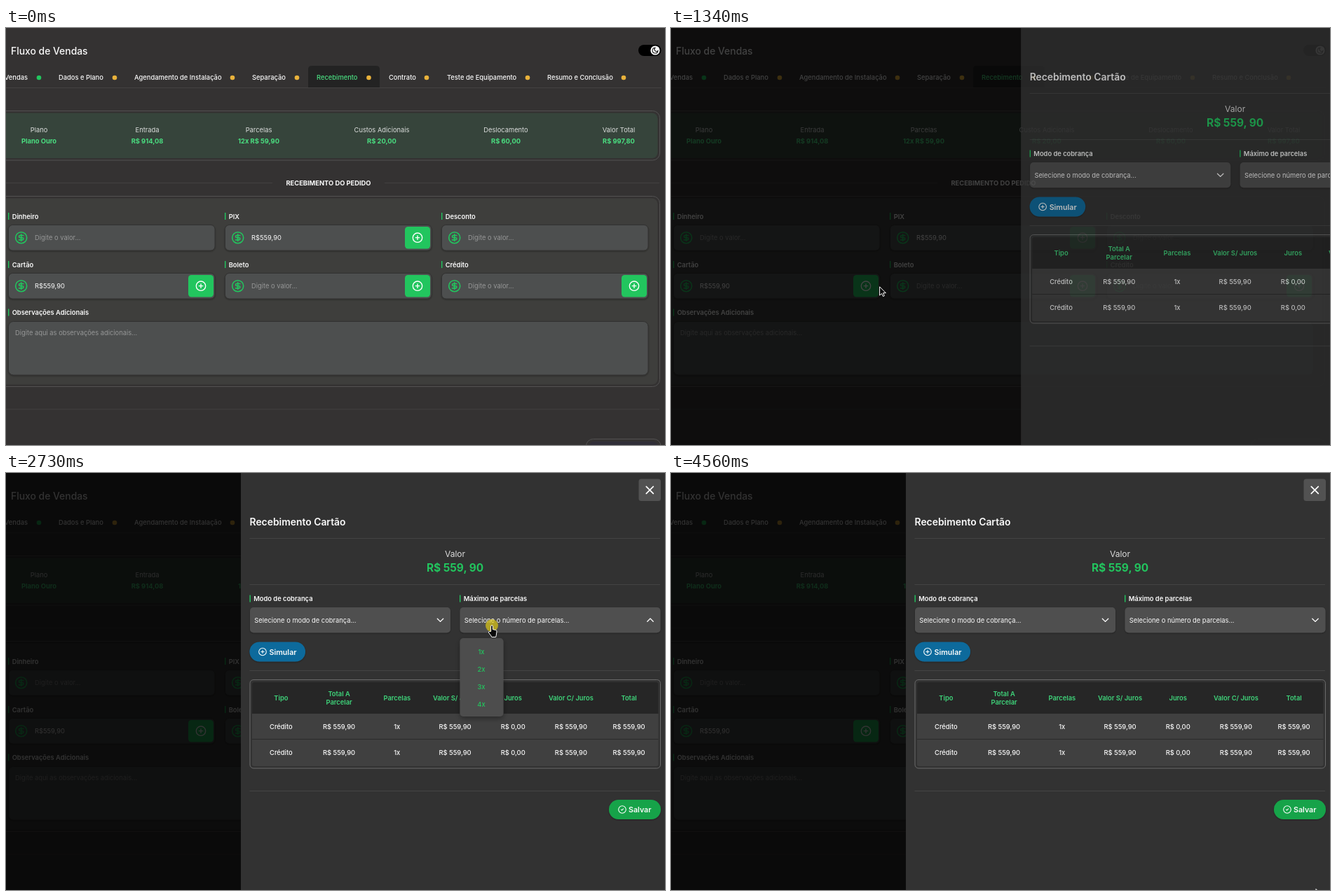
Recreate the animation shown at these times as an HTML page. Size 940 px wide and 596 px high, loop 4.63 s.

```html
<!DOCTYPE html>
<html lang="pt-BR">
<head>
<meta charset="utf-8">
<title>Fluxo de Vendas</title>
<style>
html, body { margin: 0; width: 100%; height: 100%; overflow: hidden; background: #343232; }
svg { display: block; width: 940px; height: 596px; }
text { font-family: Inter, "Open Sans", sans-serif; white-space: pre; }
</style>
</head>
<body>
<svg id="stage" viewBox="0 0 940 596" xmlns="http://www.w3.org/2000/svg"></svg>
<script>
const LOOP = 4630;
const GREEN = '#22c55e', MINT = '#4ade80', WHITE = '#fafafa';
const SMALL = 9.33;

const text = (x, y, s, { size = SMALL, weight = 400, fill = WHITE, anchor = 'start', id = '' } = {}) =>
  `<text ${id && `id="${id}"`} x="${x}" y="${y}" font-size="${size}" font-weight="${weight}" fill="${fill}" text-anchor="${anchor}">${s}</text>`;
const mid = (x, y, s, o = {}) => text(x, y, s, { ...o, anchor: 'middle' });
const rect = (x, y, w, h, r, fill, extra = '') =>
  `<rect x="${x}" y="${y}" width="${w}" height="${h}" rx="${r}" fill="${fill}" ${extra}/>`;
const frame = (x, y, w, h, r, stroke, extra = '') =>
  rect(x, y, w, h, r, 'none', `stroke="${stroke}" ${extra}`);
const hline = (x1, x2, y, color = '#434141') => rect(x1, y, x2 - x1, 1, 0, color);

// Icons are drawn on a 24 unit grid around their centre.
const icon = (x, y, scale, color, d, id = '') =>
  `<g transform="translate(${x} ${y})"><g ${id && `id="${id}"`}><g transform="scale(${scale}) translate(-12 -12)" fill="none" stroke="${color}"
   stroke-width="2" stroke-linecap="round" stroke-linejoin="round"><circle cx="12" cy="12" r="10"/><path d="${d}"/></g></g></g>`;
const DOLLAR = 'M16 8h-6a2 2 0 1 0 0 4h4a2 2 0 1 1 0 4H8M12 18V6';
const PLUS = 'M8 12h8M12 8v8';
const CHECK = 'M9 12l2 2 4-4';

const label = (x, y, s, id) =>
  rect(x, y - 8.5, 1.4, 10, 0, GREEN) + text(x + 5.7, y, s, { weight: 600, id });

function field(x, y, name, value, button, id = '') {
  let out = label(x, y - 8.5, name, id && id + 'Label');
  out += rect(x + .5, y + .5, 294.5, 36.5, 6, '#4e4f4f', 'stroke="#323231" filter="url(#soft)"');
  out += icon(x + 18.7, y + 18.7, .8, GREEN, DOLLAR);
  out += text(x + 38, y + 22.3, value || 'Digite o valor...', { fill: value ? WHITE : '#969797' });
  if (button) {
    out += rect(x + 257, y + 3, 36, 31.5, 4.5, GREEN);
    out += icon(x + 275, y + 18.7, .67, '#fff', PLUS, id && id + 'Plus');
  }
  return out;
}

function page() {
  const tabs = [
    ['Dados e Plano', 75, 155], ['Agendamento de Instalação', 183, 323], ['Separação', 351, 415],
    ['Recebimento', 443, 517.5], ['Contrato', 546, 600], ['Teste de Equipamento', 629, 744],
    ['Resumo e Conclusão', 772, 881]
  ];
  const stats = [
    ['Plano', 'Plano Ouro', 47], ['Entrada', 'R$ 914,08', 201.5], ['Parcelas', '12x R$ 59,90', 360.5],
    ['Custos Adicionais', 'R$ 20,00', 536], ['Deslocamento', 'R$ 60,00', 713], ['Valor Total', 'R$ 997,80', 874]
  ];
  const dot = (x, c) => `<circle cx="${x}" cy="71" r="3.3" fill="${c}"/>`;
  let out = rect(0, 0, 940, 596, 0, '#343232');
  out += text(7, 37.5, 'Fluxo de Vendas', { size: 13.9, weight: 500 });
  out += rect(902, 24, 32.5, 16, 8, '#000') + '<circle cx="926" cy="32" r="6.6" fill="#fff"/>' +
    '<path d="M926 28.2a3.9 3.9 0 1 0 3.9 4.4a2.9 2.9 0 0 1 -3.9 -4.4z" fill="none" stroke="#111" stroke-width="1.1"/>';
  out += hline(0, 935, 85);
  out += '<path d="M431 85V59q0-5 5-5h92q5 0 5 5v26z" fill="#232323"/>';
  out += text(31, 73.5, 'Vendas', { weight: 500, anchor: 'end' }) + dot(47, GREEN);
  for (const [name, x, d] of tabs)
    out += text(x, 73.5, name, { weight: 500, fill: name === 'Recebimento' ? MINT : WHITE }) + dot(d, '#e9b23b');
  out += frame(-20, 118.5, 952.5, 70.5, 10, '#535252');
  out += rect(-20, 121.5, 949.5, 64.5, 8, '#36443b');
  for (const [name, value, x] of stats)
    out += mid(x, 149.3, name, { fill: '#dcdedd' }) + mid(x, 164.8, value, { weight: 700, fill: MINT });
  out += hline(0, 380, 221) + hline(540, 932, 221);
  out += mid(460, 225, 'RECEBIMENTO DO PEDIDO', { weight: 700 });
  out += frame(-20, 240.5, 952.5, 272, 10, '#535252');
  out += rect(-20, 243.5, 949.5, 266, 8, '#3e3e3c');
  out += field(3, 281, 'Dinheiro') + field(312, 281, 'PIX', 'R$559,90', true) + field(621, 281, 'Desconto');
  out += field(3, 350, 'Cartão', 'R$559,90', true, 'card') + field(312, 350, 'Boleto', '', true) +
    field(621, 350, 'Crédito', '', true);
  out += frame(260.5, 353.5, 35, 30.5, 4.5, '#d5f5e1', 'id="cardRing"');
  out += label(3, 410, 'Observações Adicionais');
  out += rect(3.5, 419.5, 912.5, 76.5, 7, '#4e4f4f', 'stroke="#323231" filter="url(#soft)"');
  out += text(13, 439, 'Digite aqui as observações adicionais...', { fill: '#969797' });
  out += hline(0, 932, 544.5);
  out += frame(827.5, 587.5, 106.5, 40, 10, '#535252') + rect(831.5, 591, 98.5, 40, 8, '#302e38');
  return out;
}

const select = (x, name, hint, id) =>
  label(x - .5, 183, name, id + 'Label') +
  rect(x, 192, 286, 36.3, 5, '#505050', 'filter="url(#soft)"') +
  text(x + 6.3, 214, hint) +
  `<g transform="translate(${x + 271.5} 210.2)"><path id="${id}Chevron" d="M-4.2-2L0 2.2 4.2-2" fill="none" stroke="#fff" stroke-width="1.3" stroke-linecap="round" stroke-linejoin="round"/></g>` +
  frame(x - 1, 191, 288, 38.3, 6, MINT, `id="${id}Ring" stroke-width="1.8"`);

const menu = (x, items, id) =>
  `<g id="${id}Menu">` + rect(x, 236, 62, 12 + 25 * items.length, 5, '#4e4e4e', 'filter="url(#drop)"') +
  items.map((s, i) => mid(x + 30.5, 258.5 + 25 * i, s, { fill: GREEN, weight: 500 })).join('') + '</g>';

function drawer() {
  const head = ['Tipo', 'Total A|Parcelar', 'Parcelas', 'Valor S/ Juros', 'Juros', 'Valor C/ Juros', 'Total'];
  const cells = ['Crédito', 'R$ 559,90', '1x', 'R$ 559,90', 'R$ 0,00', 'R$ 559,90', 'R$ 559,90'];
  let out = rect(335, 0, 605, 596, 0, '#323232');
  out += rect(902.5, 8.5, 31.5, 31.5, 3.5, '#525252') +
    '<path d="M913.3 19.3l10 10m0-10l-10 10" stroke="#fff" stroke-width="1.7" stroke-linecap="round"/>';
  out += text(347.5, 75, 'Recebimento Cartão', { size: 13.9, weight: 600 });
  for (const y of [93, 159, 282, 454]) out += hline(347.5, 933, y, '#444');
  out += mid(640.5, 120.3, 'Valor', { size: 12, fill: '#dadada' });
  out += mid(640.5, 141.2, 'R$ 559, 90', { size: 15.4, weight: 700, fill: GREEN });
  out += select(348, 'Modo de cobrança', 'Selecione o modo de cobrança...', 'mode');
  out += select(647.5, 'Máximo de parcelas', 'Selecione o número de parcelas...', 'max');
  out += rect(347.5, 241.5, 79.5, 28, 14, '#0f6b9c', 'filter="url(#soft)"') + icon(366, 255.5, .53, '#fff', PLUS) +
    text(375.5, 259.8, 'Simular', { size: 10.67, weight: 600 });
  out += frame(348, 295.5, 585.5, 126.5, 5, '#6a6a6a');
  out += rect(351, 299, 579.5, 120, 3, '#404040') + '<path d="M351 344v-42q0-3 3-3h573.500q3 0 3 3v42z" fill="#262626"/>';
  out += hline(351, 930.5, 380, '#2a2a2a');
  const style = { weight: 600, fill: '#3fd67b' };
  head.forEach((name, i) => {
    const x = 392.4 + 82.7 * i, lines = name.split('|');
    lines.forEach((s, k) => out += mid(x, lines.length > 1 ? 318.7 + 12.6 * k : 325, s, style));
    for (const y of [365.6, 403]) out += mid(x, y, cells[i], { weight: 500 });
  });
  out += rect(860, 467, 74, 28, 14, '#16a34a', 'filter="url(#soft)"') + icon(879, 481, .53, '#fff', CHECK) +
    text(888, 485, 'Salvar', { size: 10.67, weight: 600 });
  return out + menu(348, ['Crédito', 'Débito'], 'mode') + menu(647.5, ['1x', '2x', '3x', '4x'], 'max');
}

const stage = document.getElementById('stage');
stage.innerHTML = `<defs>
  <filter id="soft" x="-10%" y="-20%" width="120%" height="150%"><feDropShadow dx="0" dy="1" stdDeviation="1" flood-opacity=".35"/></filter>
  <filter id="drop" x="-30%" y="-20%" width="160%" height="150%"><feDropShadow dx="0" dy="3" stdDeviation="3.500" flood-opacity=".35"/></filter>
  </defs>` + page() +
  `<rect id="shade" width="940" height="596" fill="#000"/><g id="drawer">${drawer()}</g>
  <circle id="click" r="9" fill="#e6d011"/>
  <g id="cursor" fill="#0a0a0a" stroke="#fff" stroke-linejoin="round">
    <path id="arrow" d="M0 0V12.300L2.900 9.700 4.900 13.800 6.800 12.900 4.900 8.900H8.800Z"/>
    <path id="hand" d="M-1.400 8.500V1.200a1.400 1.400 0 0 1 2.800 0V5.600l4 .8q1.800 .5 1.600 2.400l-.6 4.400-.7 3.300H-.2l-1.300-2.500-3-3.700q-.5-1.700 1.200-1.700z"/>
  </g>`;

const el = Object.fromEntries([...stage.querySelectorAll('[id]')].map(n => [n.id, n]));
const clamp = v => Math.min(1, Math.max(0, v));
const ramp = (t, start, length) => clamp((t - start) / length);
const smooth = p => p * p * (3 - 2 * p);
const easeOut = p => 1 - (1 - p) ** 3;
const show = (node, v) => node.setAttribute('opacity', +v);
const within = (t, a, b) => t >= a && t < b;

const path = [
  [70, 570, 497], [200, 432, 428], [340, 308, 368], [480, 272, 352], [610, 272, 352], [760, 277, 366.5],
  [1150, 277, 366.5], [1340, 297, 370], [1660, 492, 307], [1940, 621, 244], [2210, 691, 220], [2340, 693, 218],
  [2900, 693, 218], [3220, 587, 218], [3310, 567, 219], [3630, 567, 219], [3770, 684, 332], [4170, 900, 584],
  [4559, 900, 584], [4560, 920, 594.5], [LOOP, 920, 594.5]
];
function cursorAt(t) {
  const i = Math.max(1, path.findIndex(k => k[0] >= t));
  const [a, x0, y0] = path[i - 1], [b, x1, y1] = path[i];
  const p = ramp(t, a, b - a);
  return [x0 + (x1 - x0) * p, y0 + (y1 - y0) * p];
}

const clicks = [800, 2340, 2690, 3340, 3540];
const clickAlpha = t => Math.max(0, ...clicks.map(c => t < c ? 0 : .85 * (1 - ramp(t, c, c === 3540 ? 80 : 180))));

function focus(id, on) {
  show(el[id + 'Ring'], on);
  el[id + 'Label'].setAttribute('fill', on ? GREEN : WHITE);
}
function dropdown(id, t, opened, closed) {
  const turn = smooth(ramp(t, opened, 180)) - smooth(ramp(t, closed, 180));
  el[id + 'Chevron'].setAttribute('transform', `rotate(${180 * turn})`);
  show(el[id + 'Menu'], ramp(t, opened, 110) - ramp(t, closed, 80));
}

function draw(t) {
  const slide = easeOut(ramp(t, 1140, 570));
  show(el.shade, .8 * easeOut(ramp(t, 1140, 350)));
  show(el.drawer, slide);
  el.drawer.setAttribute('transform', `translate(${605 * (1 - slide)} 0)`);

  const pressed = within(t, 800, 1160);
  focus('card', pressed);
  el.cardPlus.setAttribute('transform', `scale(${pressed ? 1.25 : 1})`);
  focus('max', within(t, 2790, 3340));
  focus('mode', within(t, 3560, 4560));
  dropdown('max', t, 2340, 2735);
  dropdown('mode', t, 3340, 3540);

  const [x, y] = cursorAt(t), at = `translate(${x} ${y})`;
  const hand = within(t, 2100, 3660);
  el.cursor.setAttribute('transform', at);
  el.click.setAttribute('transform', at);
  show(el.cursor, t >= 70);
  show(el.arrow, !hand);
  show(el.hand, hand);
  show(el.click, clickAlpha(t));
}

const start = performance.now();
function tick() {
  draw((performance.now() - start) % LOOP);
  requestAnimationFrame(tick);
}
tick();
</script>
</body>
</html>
```
